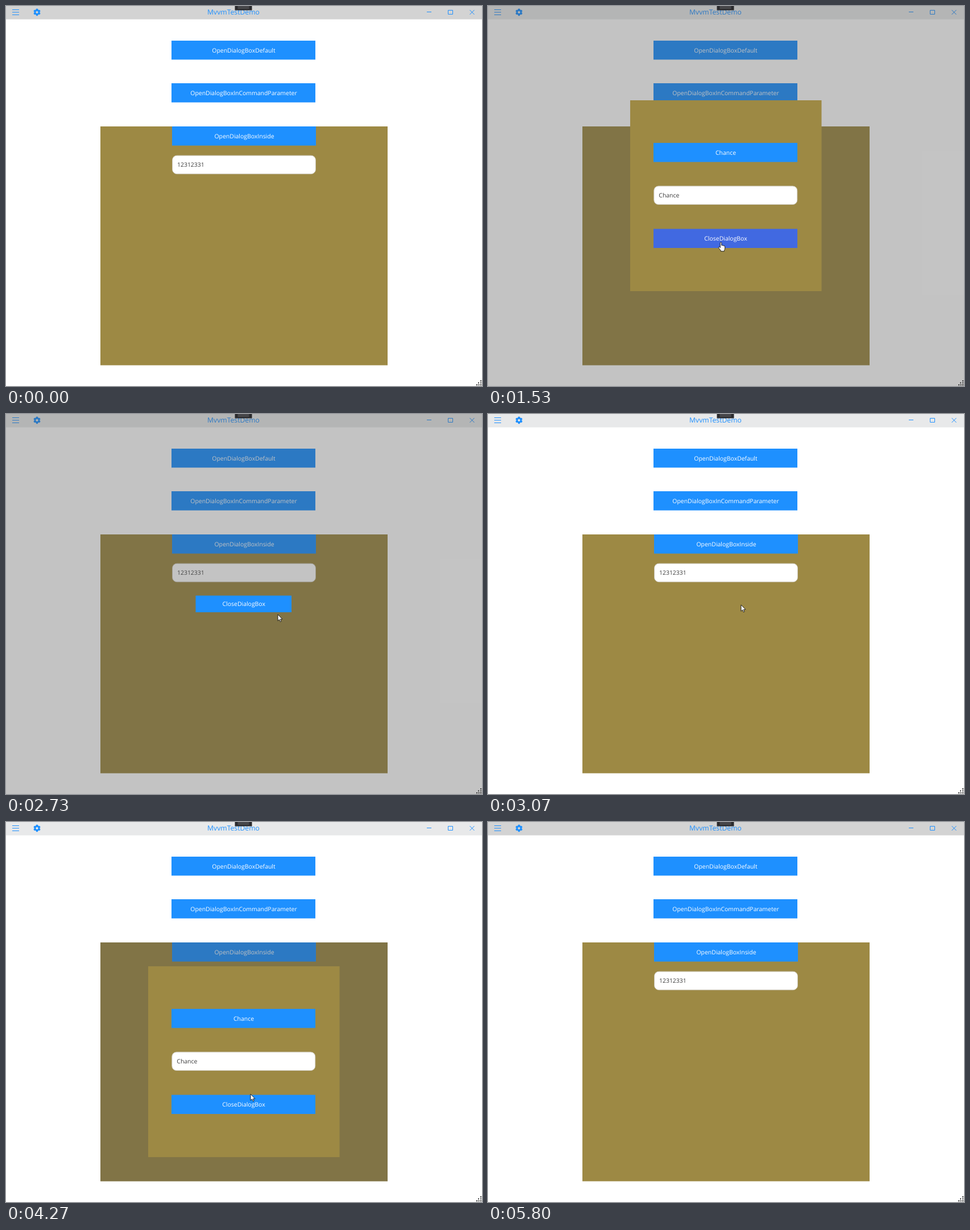
An HTML page that plays this animation: 837x669 px, repeating every 6.73 s.

```html
<!DOCTYPE html>
<html lang="en">
<head>
<meta charset="utf-8">
<title>MvvmTestDemo</title>
<style>
  html, body { margin: 0; width: 100%; height: 100%; overflow: hidden; background: #fff; }
  svg { display: block; width: 837px; height: 669px; }
  text { font: 10.45px "Open Sans", "Noto Sans", sans-serif; text-rendering: geometricPrecision; }
  .mid { text-anchor: middle; fill: #fff; }
  .title { font-size: 12.2px; fill: #1e90ff; }
  .input { fill: #3c3c3c; }
  .line { fill: none; stroke: #1e90ff; }
</style>
</head>
<body>
<svg id="stage" viewBox="0 0 837 669" xmlns="http://www.w3.org/2000/svg">
  <rect width="837" height="669" fill="#fff"/>
  <rect id="header" width="837" height="23.5"/>
  <path class="line" d="M11 6.5h12M11 11h12M11 15.5h12" stroke-width="1.1"/>
  <g id="gear" transform="translate(54.5 11)" fill="#1e90ff"></g>
  <text class="mid title" x="400" y="15.3">MvvmTestDemo</text>
  <path class="line" d="M740 10.5h8M777.5 7.5h8v7h-8zM815.5 7l8 8m0-8l-8 8"/>
  <rect x="166" y="212" width="505" height="420.5" fill="#9d8944"/>
  <g id="page"></g>
  <path d="M834 659h2v2h-2zM830 662.5h2v2h-2zM834 662.5h2v2h-2zM827 666h2v2h-2zM830.500 666h2v2h-2zM834 666h2v2h-2z" fill="#333"/>
  <rect id="shade" fill="rgb(75,75,75)" fill-opacity=".33"/>
  <g id="large"><rect x="250" y="166" width="336.500" height="336" fill="#9d8944"/></g>
  <g id="small"></g>
  <rect x="402.500" width="30" height="7.500" fill="#2b2b2e"/>
  <path d="M407.500 1.500h20M407.500 4h20" stroke="#77777a" stroke-width=".9"/>
  <g id="cursor" stroke-linejoin="round">
    <path id="arrow" d="M0 0V11.200L2.600 8.800L4.300 12.800L6.100 12L4.400 8.200H7.900Z" fill="#fff" stroke="#111" stroke-width=".9"/>
    <path id="hand" d="M-1.200 1.200Q-1.200 0 0 0T1.200 1.200V5.400Q2.300 4.500 3.300 5.800Q4.400 5.100 5.300 6.300Q7.100 5.900 7.100 7.700V11Q7 12.900 5.900 14.300V15.800H-.2V14.500L-4 9.800Q-4.600 8.300-3.200 8.100Q-2.200 8.100-1.200 9.500Z" fill="#fff" stroke="#111" stroke-width=".9"/>
  </g>
</svg>
<script>
const LOOP = 6730, TICK = 1000 / 15;
const BLUE = '#1e90ff', HOVER = '#4169e1';
const $ = id => document.getElementById(id);

function add(parent, tag, attrs, label) {
  const el = document.createElementNS('http://www.w3.org/2000/svg', tag);
  for (const name in attrs) el.setAttribute(name, attrs[name]);
  if (label) el.textContent = label;
  return parent.appendChild(el);
}

function button(parent, x, y, width, height, label) {
  const el = add(parent, 'rect', { x, y, width, height, fill: BLUE });
  add(parent, 'text', { class: 'mid', x: x + width / 2 + .5, y: y + height / 2 + 3.8 }, label);
  return { el, x, y, width, height };
}

function input(parent, x, y, value) {
  add(parent, 'rect', { x, y, width: 252, height: 32.5, rx: 8, fill: '#fff', stroke: '#c9c4b4' });
  add(parent, 'text', { class: 'input', x: x + 8.5, y: y + 20.2 }, value);
}

const page = $('page'), large = $('large');
const openers = [
  button(page, 291, 61, 253, 33.4, 'OpenDialogBoxDefault'),
  button(page, 291, 136, 253, 33.7, 'OpenDialogBoxInCommandParameter'),
  button(page, 292, 212, 253, 33.7, 'OpenDialogBoxInside')
];
input(page, 292.5, 263.2, '12312331');

button(large, 291, 241, 253, 33.6, 'Chance');
input(large, 291.8, 317, 'Chance');
const closeLarge = button(large, 291, 392.4, 253, 33.6, 'CloseDialogBox');
const closeSmall = button($('small'), 333.5, 319.7, 168.5, 29.3, 'CloseDialogBox');

add($('gear'), 'circle', { r: 3.6, fill: 'none', stroke: BLUE, 'stroke-width': 3 });
for (let a = 0; a < 360; a += 60)
  add($('gear'), 'rect', { x: -1.6, y: -6.2, width: 3.2, height: 2.6, rx: .5, transform: `rotate(${a})` });

// Dialogs: opened, closed, opener index, close button, vertical shift
const dialogs = [
  { from: 600, to: 1600, opener: 0, close: closeLarge, dy: 0 },
  { from: 2333, to: 3067, opener: 1, close: closeSmall, dy: 0 },
  { from: 3933, to: 4600, opener: 2, close: closeLarge, dy: 88 }
];

// Pointer stops: time, x, y
const path = [
  [133, 520, 190], [467, 424, 80], [800, 424, 82], [1133, 408, 424], [1533, 409.5, 416],
  [1600, 409.5, 416], [2000, 428.5, 157], [2333, 430, 158], [2733, 478, 353],
  [2933, 446, 337], [3067, 445, 336], [3667, 438.5, 233], [3933, 439, 234],
  [4267, 430, 479], [4467, 426, 498], [4600, 426, 499], [4867, 432, 560]
];

function pointer(t) {
  const i = path.findIndex(p => p[0] > t);
  if (i < 1) return null;
  const [t0, x0, y0] = path[i - 1], [t1, x1, y1] = path[i];
  const u = (t - t0) / (t1 - t0), e = u * u * (3 - 2 * u);
  return { x: x0 + (x1 - x0) * e, y: y0 + (y1 - y0) * e };
}

const hit = (p, b, dy = 0) => !!p && p.x >= b.x && p.x < b.x + b.width &&
  p.y >= b.y + dy && p.y < b.y + dy + b.height;
const show = (el, on) => el.setAttribute('display', on ? 'inline' : 'none');

function paint(b, on) {
  b.el.setAttribute('fill', on ? HOVER : BLUE);
  return on;
}

function render(time) {
  const t = Math.floor((time + 5) / TICK) * TICK + 1;
  const p = pointer(t);
  const open = dialogs.find(d => t >= d.from && t < d.to);
  let hot = false;

  $('header').setAttribute('fill', t >= 600 && t < 5800 ? '#e8e9ea' : '#d3d3d3');
  openers.forEach((b, i) => {
    if (paint(b, (!open || open.opener === i) && hit(p, b))) hot = true;
  });
  for (const b of [closeLarge, closeSmall])
    if (paint(b, !!open && open.close === b && hit(p, b, open.dy))) hot = true;

  show($('shade'), open);
  show(large, open && open.close === closeLarge);
  show($('small'), open && open.close === closeSmall);
  if (open) {
    const box = open.dy ? [166, 212, 505, 420.5] : [0, 0, 837, 669];
    ['x', 'y', 'width', 'height'].forEach((name, i) => $('shade').setAttribute(name, box[i]));
    large.setAttribute('transform', `translate(0 ${open.dy})`);
  }

  show($('cursor'), p);
  show($('hand'), hot);
  show($('arrow'), !hot);
  if (p) $('cursor').setAttribute('transform', `translate(${p.x} ${p.y})`);
}

const start = performance.now();
function frame() {
  render((performance.now() - start) % LOOP);
  requestAnimationFrame(frame);
}
frame();
</script>
</body>
</html>
```
